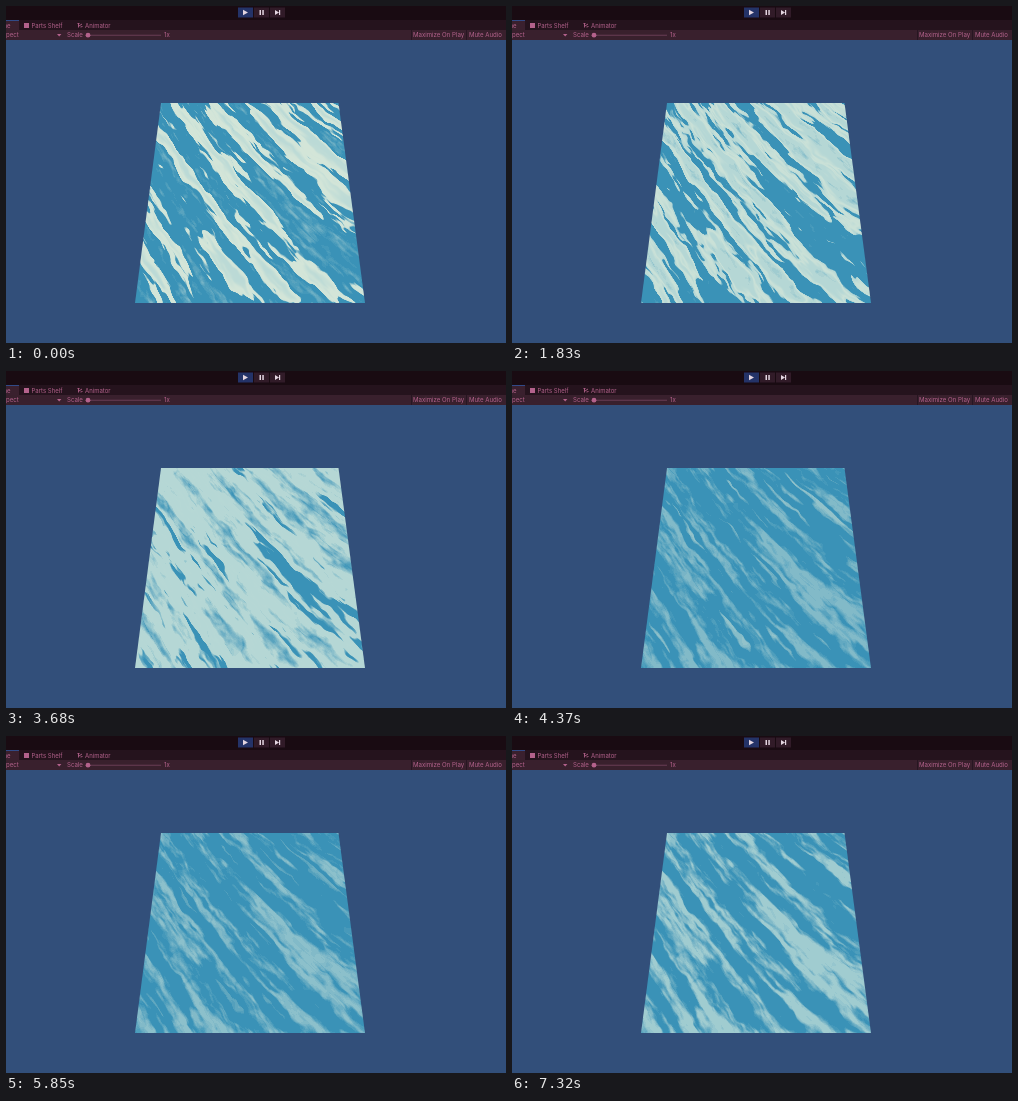
These frames come from a looping animation (500x337 px, 7.39 s). An HTML page with a canvas:

```html
<!DOCTYPE html>
<html lang="en">
<head>
<meta charset="utf-8">
<title>Stylised water</title>
<style>
  html, body { margin: 0; width: 100%; height: 100%; overflow: hidden; background: #324f7a; }
  svg { position: absolute; left: 0; top: 0; font: 6px Inter, Roboto, sans-serif; fill: #b4628c; }
  canvas { position: absolute; left: 129px; top: 97px;
    clip-path: polygon(26px 0, 203.5px 0, 230px 200px, 0 200px); }
</style>
</head>
<body>
<svg width="500" height="337" viewBox="0 0 500 337">
  <rect width="500" height="14" fill="#190b12"/>
  <rect y="14" width="500" height="10" fill="#25131d"/>
  <rect y="14" width="13" height="10" fill="#3a202e"/>
  <rect y="14" width="13" height="1" fill="#314a87"/>
  <rect y="24" width="500" height="10" fill="#39202d"/>

  <rect x="232" y="1.5" width="15" height="10" fill="#243368"/>
  <rect x="248" y="1.5" width="15" height="10" fill="#311b28"/>
  <rect x="264" y="1.5" width="15" height="10" fill="#311b28"/>
  <g fill="#e3d5e0">
    <path d="M237 3.8l5 2.7-5 2.7z"/>
    <path d="M253.5 4h1.5v5h-1.5zM256.3 4h1.5v5h-1.5z"/>
    <path d="M269 4l4 2.5-4 2.5zM273 4h1.2v5H273z"/>
  </g>

  <text x="-2.5" y="21.8">ne</text>
  <rect x="18" y="17" width="5" height="5"/>
  <text x="25.5" y="21.8">Parts Shelf</text>
  <path d="M71.5 17.5h2M72.5 17.5v4M73 20l3-2M74.5 21l2-.5" fill="none" stroke="#b4628c" stroke-width=".9"/>
  <text x="79" y="21.8">Animator</text>

  <g font-size="6.1">
    <text x="0" y="31.4">pect</text>
    <text x="61" y="31.4">Scale</text>
    <text x="158" y="31.4">1x</text>
    <text x="407" y="31.4">Maximize On Play</text>
    <text x="463" y="31.4">Mute Audio</text>
  </g>
  <path d="M51 28h4.4l-2.2 2.6z"/>
  <rect x="82" y="28.8" width="73" height=".8" fill="#75435e"/>
  <circle cx="82" cy="29.2" r="2.4"/>
  <path d="M405.5 24v10M460.5 24v10" stroke="#241520" stroke-width=".8"/>
</svg>
<canvas id="water" width="230" height="200"></canvas>
<script>
const W = 230, H = 200, LOOP = 7390, STEP = 77.13, CYCLE = 1565;
const BLUE = [58, 146, 183], PALE = [181, 215, 213], CREAM = [211, 229, 216];

// Upper ends of the main wave crests, in stage pixels.
const CRESTS = [[150, 118], [178, 106], [207, 98], [240, 99], [268, 98], [303, 94],
                [141, 198], [132, 240], [201, 230], [252, 250], [298, 254]];
const TROUGH = [240, 160];

const mix = (a, b, k) => a + (b - a) * k;
const clamp = k => Math.min(1, Math.max(0, k));
const smooth = k => k * k * (3 - 2 * k);
const ramp = (from, to, k) => smooth(clamp((k - from) / (to - from)));

function hash(x, y) {
  let n = Math.imul(x, 374761393) ^ Math.imul(y, 668265263);
  n = Math.imul(n ^ (n >>> 13), 1274126177);
  return ((n ^ (n >>> 16)) >>> 0) / 4294967296;
}
function noise(x, y) {
  const i = Math.floor(x), j = Math.floor(y);
  const a = smooth(x - i), b = smooth(y - j);
  return mix(mix(hash(i, j), hash(i + 1, j), a),
             mix(hash(i, j + 1), hash(i + 1, j + 1), a), b) * 2 - 1;
}

// Stage point to coordinates along and across the waves, which fan out slightly.
function flow([x, y]) {
  const v = y - 97, left = 155 - v * .13, right = 332.5 + v * .13;
  const u = (x - left) / (right - left) * 200;
  const along = (u + v) * .7071, across = (u - v) * .7071;
  return [along, across + (.06 - .0015 * across) * (along - 100)];
}

// A band starts at a point and runs with the waves, shorter further down.
function band(point, width, sharp) {
  const [r0, q0] = flow(point), length = 230 - .7 * point[1];
  return (r, q) => {
    const t = r - r0, d = q - q0;
    const taper = clamp(Math.min(t + 8, length + 8 - t) / 26);
    return taper * clamp(1 - (d > 0 ? d / (width * sharp) : -d / width));
  };
}
const crests = CRESTS.map(p => band(p, 10, .5));
const trough = band(TROUGH, 15, 1);

function heightAt(r0, q0) {
  const q = q0 + 2.2 * noise(r0 / 19, q0 / 14) + .8 * noise(r0 / 6, q0 / 5 + 40);
  const r = r0 + 4 * noise(r0 / 9 + 70, q0 / 5);
  let h = .4 * noise(q / 6 + 11, r / 55) + .3 * noise(q / 3, r / 24 + 30)
        + .14 * noise(q / 1.6 + 50, r / 9) - .5 * trough(r, q);
  for (const crest of crests) h += .95 * crest(r, q);
  return h;
}

// Heights become ranks from 0 to 1, so the covered area follows the phase.
const raw = new Float32Array(W * H), rank = new Float32Array(W * H), mottle = new Float32Array(W * H);
for (let i = 0; i < W * H; i++) {
  const [r, q] = flow([129.5 + i % W, 97.5 + Math.floor(i / W)]);
  raw[i] = heightAt(r, q);
  const vein = clamp(1 - 7 * Math.abs(noise(q / 6 + 20, r / 30 + 8)));
  mottle[i] = .09 * noise(q / 3.5 + 90, r / 9) + .05 * noise(q / 1.7, r / 4 + 60) + .07 * vein;
}
Array.from(raw.keys()).sort((a, b) => raw[a] - raw[b])
  .forEach((i, n) => rank[i] = n / (W * H));

const ctx = document.getElementById('water').getContext('2d');
const image = ctx.createImageData(W, H), px = image.data;

// Each point lights up, tallest first, then fades; the whole swell dims late in the cycle.
function draw(time) {
  const phase = time % CYCLE / CYCLE;
  const swell = 1 - ramp(.55, 1.05, phase);
  for (let i = 0, o = 0; i < W * H; i++, o += 4) {
    const since = phase - .36 + .63 * rank[i];
    const age = since - Math.floor(since);
    const fresh = since >= 1 || phase < .5;
    const fade = 1 - ramp(.36, .78, age + mottle[i]);
    const light = clamp(age / .05) * fade * (fresh ? 1 : swell);
    const tone = Math.round(light * 12) / 12;
    const foam = ramp(.4, .75, rank[i]) * (1 - ramp(.14, .32, age));
    for (let j = 0; j < 3; j++) px[o + j] = mix(BLUE[j], mix(PALE[j], CREAM[j], foam), tone);
    px[o + 3] = 255;
  }
  ctx.putImageData(image, 0, 0);
}

const begin = performance.now();
let shown = -1;
function tick() {
  const time = (performance.now() - begin) % LOOP;
  const step = Math.floor((time + 18) / STEP);
  if (step !== shown) draw((shown = step) * STEP);
  requestAnimationFrame(tick);
}
tick();
</script>
</body>
</html>
```
